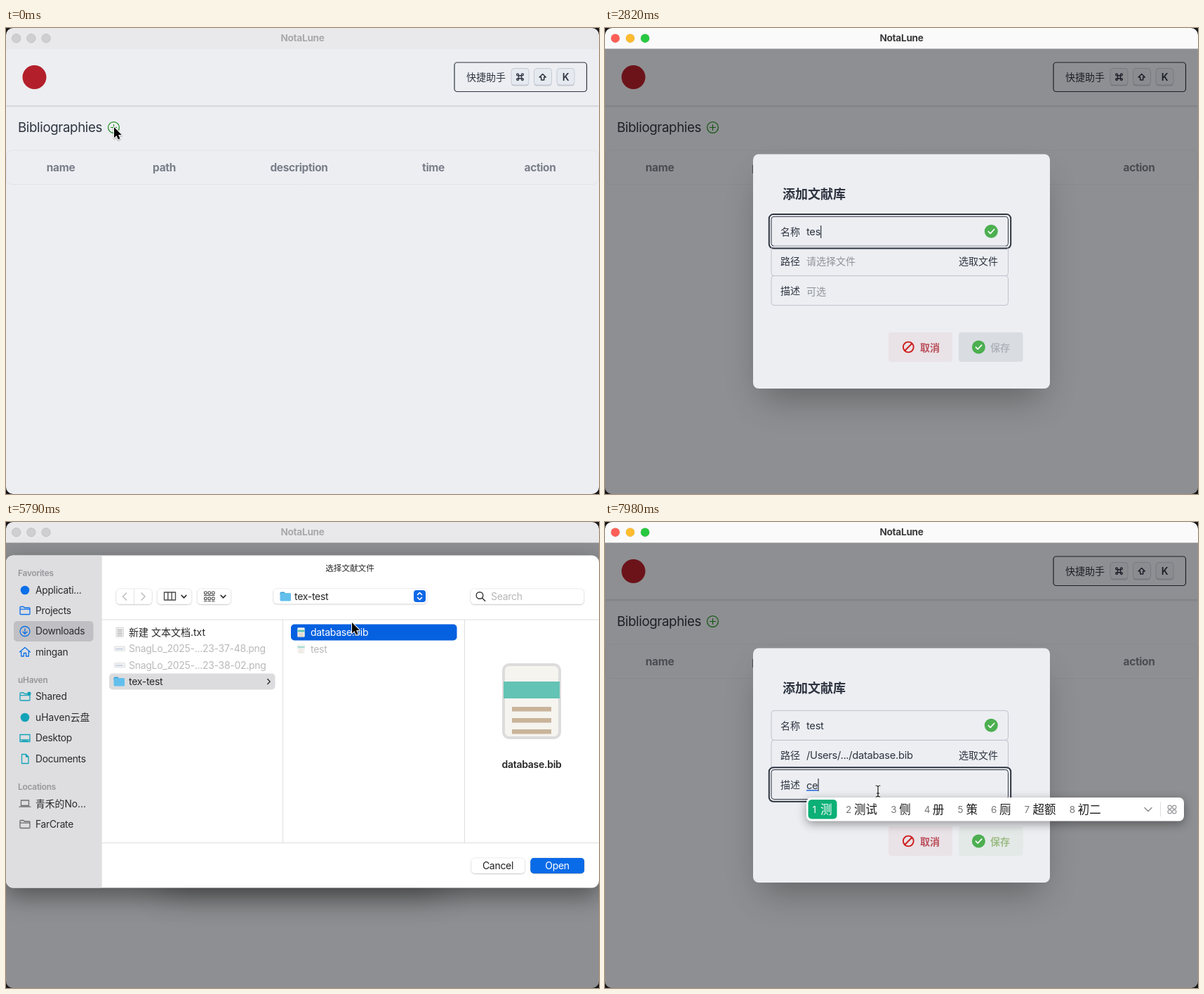
An HTML page with a canvas for the animation above (8000 ms loop, 845x663 px).

```html
<!DOCTYPE html>
<html lang="zh">
<head>
<meta charset="utf-8">
<title>NotaLune</title>
<style>
html, body { margin: 0; width: 100%; height: 100%; overflow: hidden; background: #17171b; }
canvas { display: block; width: 845px; height: 663px; }
</style>
</head>
<body>
<canvas id="stage"></canvas>
<script>
const W = 845, H = 663, LOOP = 8000;
const FONT = 'Inter, "Noto Sans CJK SC", "Noto Sans CJK", sans-serif';
const INK = '#2e3440', BASE = '#eceef2', GREEN = '#4caf50';
const APP = 'NotaLune', USER = 'mingan', DRIVE = 'uHaven';
const BLUE = '#0a6fe8', CYAN = '#13a3b8', GRAY = '#6c6c70';

const canvas = document.getElementById('stage');
const dpr = window.devicePixelRatio || 1;
canvas.width = W * dpr;
canvas.height = H * dpr;
const c = canvas.getContext('2d');

const clamp = v => Math.max(0, Math.min(1, v));
const ramp = (t, a, b) => clamp((t - a) / (b - a));
const smooth = p => p * p * (3 - 2 * p);
const mix = (a, b, p) => `rgb(${a.map((v, i) => Math.round(v + (b[i] - v) * p))})`;

function text(s, x, y, size, color, weight = 400, align = 'left') {
  const cjk = /[\u3000-\u9fff\uff0c]/.test(s);
  c.font = `${weight} ${size}px ${FONT}`;
  c.letterSpacing = cjk ? '0px' : `${-0.02 * size}px`;
  c.textAlign = align;
  c.fillStyle = color;
  c.fillText(s, x, y + size * (cjk ? 0.38 : 0.36));
  return c.measureText(s).width;
}

function box(x, y, w, h, r, fill, stroke, line = 1) {
  c.beginPath();
  c.roundRect(x, y, w, h, r);
  if (fill) { c.fillStyle = fill; c.fill(); }
  if (stroke) { c.strokeStyle = stroke; c.lineWidth = line; c.stroke(); }
}

function dot(x, y, r, fill, stroke, line = 1) {
  c.beginPath();
  c.arc(x, y, r, 0, 7);
  if (fill) { c.fillStyle = fill; c.fill(); }
  if (stroke) { c.strokeStyle = stroke; c.lineWidth = line; c.stroke(); }
}

function path(d, x, y, stroke, line = 1.3, fill) {
  const p = new Path2D(d);
  c.save();
  c.translate(x, y);
  c.lineCap = c.lineJoin = 'round';
  if (fill) { c.fillStyle = fill; c.fill(p); }
  if (stroke) { c.strokeStyle = stroke; c.lineWidth = line; c.stroke(p); }
  c.restore();
}

function layer(alpha, draw) {
  if (alpha <= 0) return;
  c.save();
  c.globalAlpha = alpha;
  draw();
  c.restore();
}

function shadowed(color, blur, dy, draw) {
  c.save();
  c.shadowColor = color;
  c.shadowBlur = blur * dpr;
  c.shadowOffsetY = dy * dpr;
  draw();
  c.restore();
}

// ---- main window ----

function titleBar(active) {
  c.fillStyle = active ? '#fafafa' : '#e9e9ec';
  c.fillRect(0, 0, W, 29.5);
  ['#ff5f57', '#febc2e', '#28c840'].forEach((col, i) =>
    dot(14.7 + i * 21.2, 14.7, 6.2, active ? col : '#cfcfd1', active ? 'rgba(0,0,0,.1)' : '#bdbdbf', 0.8));
  text(APP, 422.5, 14, 13.6, active ? '#3b3b3d' : '#a9a9ac', 700, 'center');
}

function keyCap(x) {
  box(x + 0.5, 58.5, 25, 24, 4, '#c3c8d2');
  box(x + 0.5, 57.5, 25, 23.5, 4, '#e5e9f0', '#c6cbd5');
}

function page(t) {
  c.fillStyle = BASE;
  c.fillRect(0, 29, W, H);
  shadowed('rgba(0,0,0,.18)', 3, 1, () => { c.fillStyle = BASE; c.fillRect(0, 30, W, 80); });
  dot(40.5, 70, 17, '#b3202b');

  box(639, 49, 188.5, 41.5, 4, null, INK, 1.2);
  text('快捷助手', 656, 70, 14, INK, 500);
  [719.5, 752, 784.5].forEach(keyCap);
  path('M-2-2H2V2H-2ZM-2-2V-3.3A1.4 1.4 0 1 0-3.4-2H-2M2-2H3.4A1.4 1.4 0 1 0 2-3.4V-2M2 2V3.4A1.4 1.4 0 1 0 3.4 2H2M-2 2H-3.4A1.4 1.4 0 1 0-2 3.4V2',
    732.5, 69.7, INK, 1.4);
  path('M0-4.5L4.6 0H2V4H-2V0H-4.6Z', 764.7, 70, INK, 1.5);
  text('K', 797.5, 70, 14, INK, 600, 'center');

  text('Bibliographies', 17, 141, 18.7, INK);
  dot(153.5, 141.5, 7.9, null, '#218f21', 1.3);
  path('M-4 0H4M0-4V4', 153.5, 141.5, '#218f21', 1.2);

  box(0.5, 174, 844, 48.5, 8, null, '#e0e3e9');
  [['name', 78], ['path', 225.5], ['description', 417.5], ['time', 609], ['action', 761]]
    .forEach(([s, x]) => text(s, x, 198.5, 15.4, '#7a7e89', 700, 'center'));

  layer(ramp(t, 750, 950) * (1 - ramp(t, 1330, 1480)), () => {
    path('M3-4L-1 0L3 4Z', 173, 141.5, null, 0, '#4c566a');
    box(174.5, 128, 133, 26.5, 4, '#4c566a');
    text('Add bibliography', 183, 142, 14.9, '#e3e7ee');
  });
}

// ---- form dialog ----

function checkMark(x, y) {
  dot(x, y, 9.5, GREEN);
  path('M-4 .2L-1.2 3L4.3-2.8', x, y, '#fff', 1.7);
}

function field(y, label, focused) {
  if (focused) box(233.8, y - 3.2, 344.4, 48.4, 6, null, INK, 2);
  box(237, y, 337.5, 42, 4, null, focused ? INK : '#bfc3cb');
  text(label, 250, y + 21.5, 14, INK);
}

function caret(x, y) {
  c.fillStyle = INK;
  c.fillRect(x, y - 9, 1.2, 18);
}

function modal(t) {
  shadowed('rgba(0,0,0,.3)', 50, 25, () => box(223, 192, 399, 309, 8, BASE));
  box(211, 179.5, 423, 333.5, 8, BASE);
  text('添加文献库', 253, 236.5, 18, INK, 700);

  const naming = t >= 1960 && t < 3800;
  const describing = t >= 6990;
  const chosen = t >= 6000;

  field(268.3, '名称', naming);
  field(310.5, '路径', false);
  field(352.5, '描述', describing);

  const typed = 'test'.slice(0, [2260, 2660, 2820, 3000].filter(k => t >= k).length);
  const nameWidth = text(typed, 287, 290, 14.7, INK);
  if (naming) caret(287 + nameWidth, 290);
  if (typed) checkMark(550.3, 289.3);
  else {
    dot(550.3, 289.3, 10.4, '#d32f2f');
    path('M-4-4L4 4M4-4L-4 4', 550.3, 289.3, '#fff', 1.7);
  }

  if (chosen) text('/Users/.../database.bib', 287, 332, 14.7, INK);
  else text('请选择文件', 287, 332, 14, '#8f929a');
  text('选取文件', 504, 332, 14, INK);

  if (t < 7320) text('可选', 287, 374.5, 14, '#8f929a');
  else {
    const w = text(t < 7780 ? 'c' : 'ce', 287, 374.5, 14.7, INK);
    c.fillStyle = '#2a6fe0';
    c.fillRect(287, 381, w, 1.6);
    caret(287 + w, 374);
  }
  if (describing && t < 7320) caret(287, 374);

  box(404, 433, 91, 42, 4, '#e9e2e6');
  dot(432.3, 454, 7.4, null, '#cf1d1d', 1.9);
  path('M-5 5L5-5', 432.3, 454, '#cf1d1d', 1.9);
  text('取消', 449, 454.5, 14, '#bb4f5c', 700);

  const ready = ramp(t, 6330, 6410);
  box(504, 433, 91.5, 42, 4, mix([217, 221, 226], [227, 233, 231], ready));
  checkMark(532.4, 454);
  text('保存', 549, 454.5, 14, mix([176, 181, 188], [158, 188, 134], ready), 700);

  layer(ramp(t, 3480, 3680) * (1 - ramp(t, 6700, 6850)), () => {
    if (chosen) {
      box(236.5, 360, 338, 44.5, 4, '#a3be8c');
      text(`/Users/${USER}/Downloads/tex-`, 405.5, 374, 14.6, '#10130f', 400, 'center');
      text('test/database.bib', 405.5, 392, 14.6, '#10130f', 400, 'center');
    } else {
      box(326.5, 360, 158.5, 26.5, 4, '#bf616a');
      text('未选择文件，点击选择', 335, 374, 14.2, '#0d0708');
    }
  });
}

// ---- file picker ----

const FOLDER = 'M-7-4.5Q-7-5.5-6-5.5H-2L-.5-4H6Q7-4 7-3V4.5Q7 5.5 6 5.5H-6Q-7 5.5-7 4.5ZM-7-1.8H7';
const ICONS = {
  folder: FOLDER,
  down: 'M-7 0A7 7 0 1 1 7 0A7 7 0 1 1-7 0M0-3.5V3.5M-3 .8L0 3.7L3 .8',
  home: 'M-7.5 0L0-6.5L7.5 0M-5.3-1.5V6H-1.6V1.5H1.6V6H5.3V-1.5',
  desk: 'M-7-5H7V5H-7ZM-7 2.4H7M-4 3.8H4',
  doc: 'M-4.5-6.5H1.5L5-3V6.5H-4.5ZM1.5-6.5V-3H5',
  laptop: 'M-5.5-4.5H5.5V3H-5.5ZM-8 4.7H8'
};

const SIDEBAR = [
  ['Applicati...', 97, 'dot', BLUE], ['Projects', 126, 'folder', BLUE],
  ['Downloads', 155.5, 'down', BLUE], [USER, 185, 'home', BLUE],
  ['Shared', 248.5, 'folder', CYAN], [DRIVE + '云盘', 278, 'dot', CYAN],
  ['Desktop', 307.5, 'desk', CYAN], ['Documents', 337, 'doc', CYAN],
  ['青禾的No...', 400.5, 'laptop', GRAY], ['FarCrate', 430, 'folder', GRAY]
];

function control(x, y, w, h, fill = '#fff') {
  shadowed('rgba(0,0,0,.22)', 2, 0.8, () => box(x, y, w, h, 5, fill));
  box(x, y, w, h, 5, fill, 'rgba(0,0,0,.07)', 0.8);
}

function blueFolder(x, y) {
  box(x - 7.5, y - 6.5, 7, 5, 1.5, '#3aa0d2');
  box(x - 7.5, y - 5, 15.5, 11.5, 1.5, '#62bfec');
}

function sheetIcon(x, y, k = 1) {
  c.save();
  c.translate(x, y);
  c.scale(k, k);
  box(-5, -6.5, 10, 13, 1, '#f5f4ef', '#dcdcdc', 0.5);
  box(-5, -3.5, 10, 3, 0, '#63c3b4');
  [1, 3, 5].forEach(v => box(-3.5, v, 7, 0.8, 0, '#c9b49a'));
  c.restore();
}

function fileRow(x, y, label, color) {
  text(label, x, y, 14, color);
}

function picker(t) {
  const picked = t >= 5550;
  shadowed('rgba(0,0,0,.42)', 34, 12, () => box(0, 47.5, W, 473, 10, '#fff'));
  c.save();
  c.beginPath();
  c.roundRect(0, 47.5, W, 473, 10);
  c.clip();
  c.fillStyle = '#dedee1';
  c.fillRect(0, 47, 135.5, 474);
  c.fillStyle = '#cfcfd2';
  c.fillRect(135.5, 47, 1, 474);
  c.restore();

  box(11, 141, 113.5, 29, 5, '#c0c0c4');
  [['Favorites', 73], [DRIVE, 225], ['Locations', 377]].forEach(([s, y]) => text(s, 17, y, 11.9, '#96969b', 600));
  SIDEBAR.forEach(([s, y, kind, col]) => {
    if (kind === 'dot') dot(27, y, 6.3, col);
    else path(ICONS[kind], 27, y, col, 1.3);
    text(s, 42, y, 13.8, '#2b2b2e');
  });
  dot(33, 244, 2.6, CYAN);

  text('选择文献文件', 490, 66, 11.6, '#2a2a2a', 500, 'center');
  control(157, 95, 51, 22);
  c.fillStyle = '#e2e2e2';
  c.fillRect(182, 95, 1, 22);
  path('M2.5-5L-2.5 0L2.5 5', 169, 106, '#bdbdbd', 1.5);
  path('M-2.5-5L2.5 0L-2.5 5', 195.5, 106, '#bdbdbd', 1.5);
  control(215.5, 95, 49, 22);
  path('M-8-5.5H8V5.5H-8ZM-2.7-5.5V5.5M2.7-5.5V5.5', 233.5, 105.5, '#4a4a4a', 1.4);
  control(272.5, 95, 48, 22);
  [0, 1, 2].forEach(i => {
    [99, 107].forEach(y => box(282.5 + i * 5.5, y, 3.6, 3.6, 1, null, '#4a4a4a', 1.1));
    box(282 + i * 5.5, 112.3, 4.5, 1, 0, '#4a4a4a');
  });
  box(282, 104, 15.5, 1, 0, '#4a4a4a');
  [253.5, 309.5].forEach(x => path('M-3.3-1.6L0 1.8L3.3-1.6', x, 106, '#333', 1.7));

  control(381, 94.5, 218.5, 22);
  blueFolder(398, 106);
  text('tex-test', 411, 105.5, 14, '#262626');
  box(581, 97, 17, 17, 4, '#1068e6');
  path('M-3-2L0-5L3-2M-3 2L0 5L3 2', 589.5, 105.5, '#fff', 1.6);
  control(662, 95, 161.5, 22);
  dot(675, 104.5, 4.8, null, '#333', 1.4);
  path('M0 0L4 4', 678.6, 108.2, '#333', 1.5);
  text('Search', 691, 106, 14, '#b6b6b8');

  c.fillStyle = '#dedede';
  [[136, 138.5, 709, 1], [136, 456, 709, 1], [394, 139, 1, 317], [653, 139, 1, 317]].forEach(r => c.fillRect(...r));

  box(157, 150, 10.5, 13.5, 1, '#ededed', '#c9c9c9', 0.7);
  [153, 155.5, 158, 160.5].forEach(y => box(159, y, 6.5, 0.9, 0, '#a9a9a9'));
  fileRow(175, 157, '新建 文本文档.txt', '#262626');
  [['37-48', 180], ['38-02', 203.5]].forEach(([s, y]) => {
    box(154.5, y - 3, 15, 6.5, 1, '#f1f1f4', '#d5d5da', 0.6);
    box(156.5, y, 10, 1.2, 0, '#b9c4d8');
    fileRow(175, y, `SnagLo_2025-...23-${s}.png`, '#b9b9bb');
  });
  const rowInk = picked ? '#262626' : '#fff';
  box(147, 215.5, 236.5, 23, 5, picked ? '#dcdcde' : '#0561e0');
  blueFolder(161, 227);
  fileRow(175, 227, 'tex-test', rowInk);
  path('M-1.7-3.5L1.7 0L-1.7 3.5', 374.5, 227, rowInk, 1.3);

  if (picked) box(406, 145.5, 236.5, 23, 5, '#0561e0');
  sheetIcon(420.5, 157);
  fileRow(434, 157, 'database.bib', picked ? '#fff' : '#262626');
  layer(c.globalAlpha * 0.5, () => sheetIcon(420.5, 180));
  fileRow(434, 180.5, 'test', '#b9b9bb');
  if (picked) {
    sheetIcon(749, 255, 8);
    text('database.bib', 749, 345, 14, '#262626', 600, 'center');
  }

  control(663, 478, 76.5, 22);
  text('Cancel', 701, 489, 14, '#1f1f1f', 400, 'center');
  control(747.5, 478, 76.5, 22, picked ? '#0a6be8' : '#fff');
  text('Open', 785.5, 489, 14, picked ? '#fff' : '#bcbcbe', 400, 'center');
}

// ---- input method bar ----

function candidates() {
  shadowed('rgba(0,0,0,.38)', 14, 4, () => box(287, 392, 538, 33.5, 7, '#fff'));
  box(289.5, 395, 41, 27.5, 5, '#0bb077');
  text('1', 295.5, 409, 13.5, '#fff');
  text('测', 307, 408.5, 16.6, '#fff', 500);
  let x = 343;
  ['测试', '侧', '册', '策', '厕', '超额', '初二'].forEach((word, i) => {
    text(String(i + 2), x, 409, 13.5, '#77777a');
    text(word, x + 12, 408.5, 16.5, '#1c1c1e');
    x += 31 + 16.6 * word.length;
  });
  path('M-5-2.5L0 2.5L5-2.5', 774, 409, '#8a8a8d', 1.4);
  c.fillStyle = '#dededf';
  c.fillRect(791, 398, 1, 21);
  [-3.3, 3.3].forEach(dx => [-3.3, 3.3].forEach(dy => dot(808 + dx, 409 + dy, 2.6, null, '#9a9a9d', 1.2)));
}

// ---- pointer ----

const TRACK = [
  [20, 154, 141], [120, 153.5, 138.5], [1330, 153.5, 138.5], [1630, 535, 350], [1740, 528, 372],
  [1950, 440, 289], [3220, 440, 289], [3520, 548.5, 337], [4250, 548.5, 337], [4530, 345, 297],
  [4750, 345, 297], [4890, 143.5, 183], [5050, 143.5, 183], [5450, 488, 152], [5600, 488, 152],
  [5780, 493, 143], [6690, 493, 143], [6980, 389, 383]
];
const SHAPES = [[0, 'arrow'], [750, 'hand'], [1350, 'arrow'], [1580, 'beam'], [2260, 'none'], [3220, 'beam'],
  [3460, 'hand'], [4240, 'arrow'], [6930, 'beam']];

const DRAW = {
  arrow(x, y) {
    const d = 'M0 0V15.2L3.5 12L5.9 17.4L8.5 16.2L6.1 11H10.8Z';
    shadowed('rgba(0,0,0,.35)', 2, 1, () => path(d, x, y, '#fff', 2));
    path(d, x, y, null, 0, '#000');
  },
  hand(x, y) {
    const d = 'M-2 10.5V1.3A1.8 1.8 0 0 1 1.6 1.3V6Q3 4.8 4.3 6.5Q6 5.5 6.9 7.3Q9 6.8 9.2 9V12Q9 15 7.6 17.5H-.6Q-1.5 14.2-5 10.6Q-4.6 8-2 10.5Z';
    shadowed('rgba(0,0,0,.3)', 2, 1, () => path(d, x, y, '#000', 1.2, '#fff'));
    path('M1.6 6V9M4.3 6.6V9M6.9 7.4V9.4M1.3 12V15M3.7 12V15M6 12V15', x, y, '#000', 0.9);
  },
  beam(x, y) {
    const d = 'M-3-8Q-.5-8 0-6.5Q.5-8 3-8M0-6.5V6.5M-3 8Q-.5 8 0 6.5Q.5 8 3 8M-1.8 3H1.8';
    path(d, x, y, 'rgba(255,255,255,.8)', 2.8);
    path(d, x, y, '#111', 1.2);
  },
  none() {}
};

function pointer(t) {
  let i = TRACK.findIndex(k => k[0] > t);
  if (i < 0) i = TRACK.length;
  const a = TRACK[Math.max(0, i - 1)], b = TRACK[Math.min(i, TRACK.length - 1)];
  const p = a === b ? 0 : smooth(ramp(t, a[0], b[0]));
  const shape = SHAPES.filter(s => s[0] <= t).pop()[1];
  DRAW[shape](a[1] + (b[1] - a[1]) * p, a[2] + (b[2] - a[2]) * p);
}

// ---- scene ----

function render(t) {
  c.setTransform(dpr, 0, 0, dpr, 0, 0);
  c.fillStyle = '#17171b';
  c.fillRect(0, 0, W, H);
  c.save();
  c.beginPath();
  c.roundRect(0, 0, W, H, 10);
  c.clip();

  page(t);
  const dim = ramp(t, 1155, 1190);
  layer(dim, () => {
    c.fillStyle = 'rgba(0,0,0,.4)';
    c.fillRect(0, 29, W, H);
    modal(t);
  });
  titleBar(t >= 430 && t < 4210 || t >= 6350);

  const open = 1 - (1 - ramp(t, 4200, 4480)) ** 3;
  const shut = (1 - ramp(t, 6325, 6410)) ** 2;
  layer(t < 4200 ? 0 : open * shut, () => {
    const k = 0.94 + 0.06 * open;
    c.translate(W / 2, 284);
    c.scale(k, k);
    c.translate(-W / 2, -284);
    picker(t);
  });
  if (t >= 7780) candidates();
  pointer(t);
  c.restore();
}

function tick() {
  render(performance.now() % LOOP);
  requestAnimationFrame(tick);
}
tick();
</script>
</body>
</html>
```
